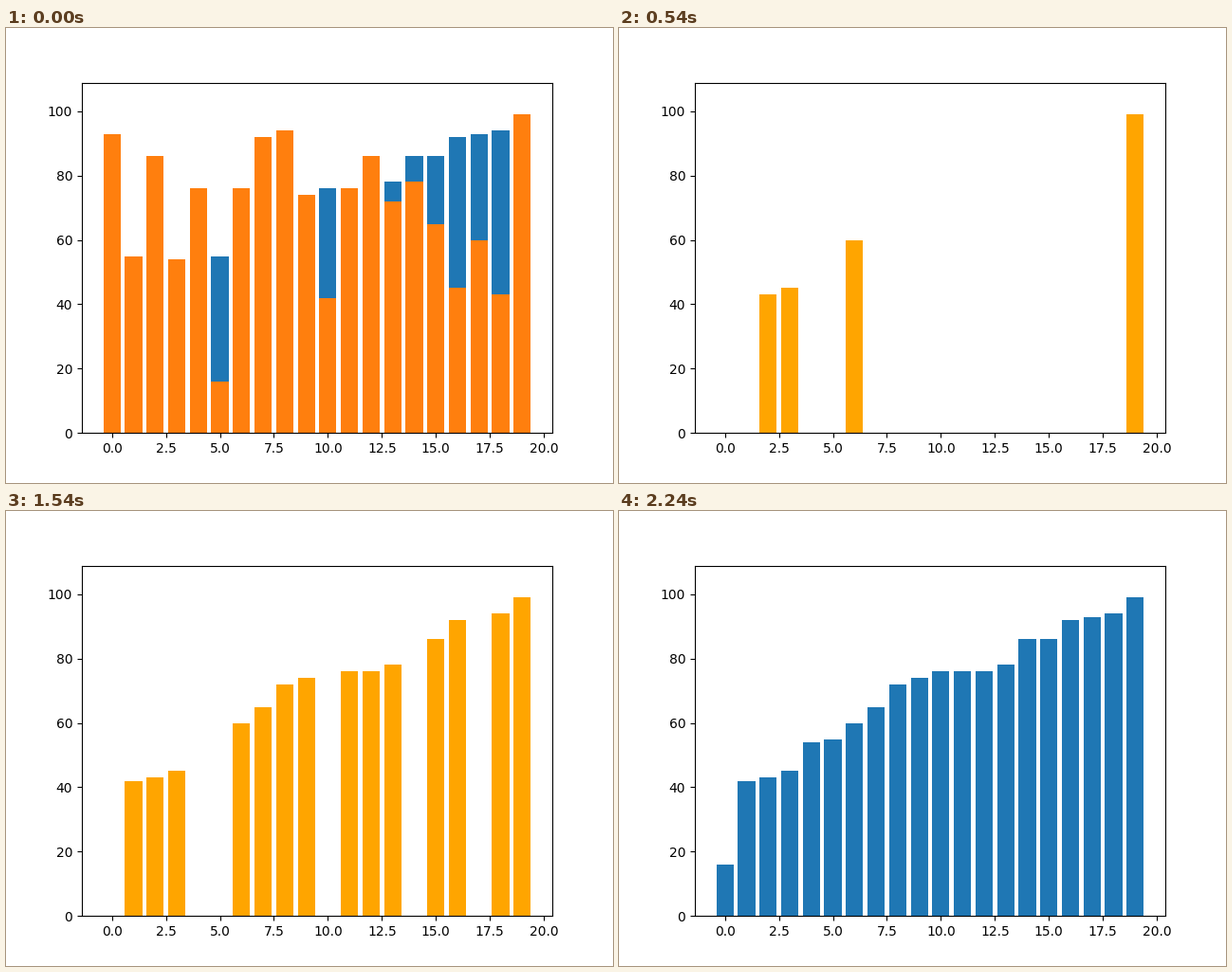
Animation, 640 px wide and 480 px high, one loop 2340 ms. Source, as a matplotlib script:

```python
import numpy as np
import matplotlib.pyplot as plt
from matplotlib.animation import FuncAnimation

VALUES = np.array([93, 55, 86, 54, 76, 16, 76, 92, 94, 74,
                   42, 76, 86, 72, 78, 65, 45, 60, 43, 99])
N = len(VALUES)
TICK = 20          # ms per drawn frame
LOOP = 2340        # ms
FILL_START = 240   # first value lands
STEP = 100         # ms between landings


def counting_sort_steps(values):
    """Output array before and after each placement, from the right."""
    ends = np.cumsum(np.bincount(values))
    out = np.zeros_like(values)
    steps = [out.copy()]
    for v in values[::-1]:
        ends[v] -= 1
        out[ends[v]] = v
        steps.append(out.copy())
    return steps


STEPS = counting_sort_steps(VALUES)
RESULT = STEPS[-1]

fig, ax = plt.subplots(figsize=(6.4, 4.8), dpi=100)
x = np.arange(N)
back = ax.bar(x, RESULT, color="C0")
front = ax.bar(x, VALUES, color="C1")
ax.set_xlim(-1.39, 20.39)
ax.set_ylim(0, VALUES.max() * 1.1)


def show(bars, heights, color):
    for bar, h in zip(bars, heights):
        bar.set_height(h)
        bar.set_color(color)
        bar.set_linewidth(0)
        bar.set_visible(h > 0)


def update(i):
    t = i * TICK
    show(back, RESULT if t < 100 else np.zeros(N), "C0")
    if t < 100:
        show(front, VALUES, "C1")
    elif t < 200:
        show(front, VALUES, "C0")
    elif t < FILL_START:
        show(front, STEPS[0], "orange")
    elif t < FILL_START + N * STEP:
        show(front, STEPS[1 + (t - FILL_START) // STEP], "orange")
    else:
        show(front, RESULT, "C0")
    return [*back, *front]


anim = FuncAnimation(fig, update, frames=LOOP // TICK, interval=TICK,
                     repeat=True, repeat_delay=0)
plt.show()
```
